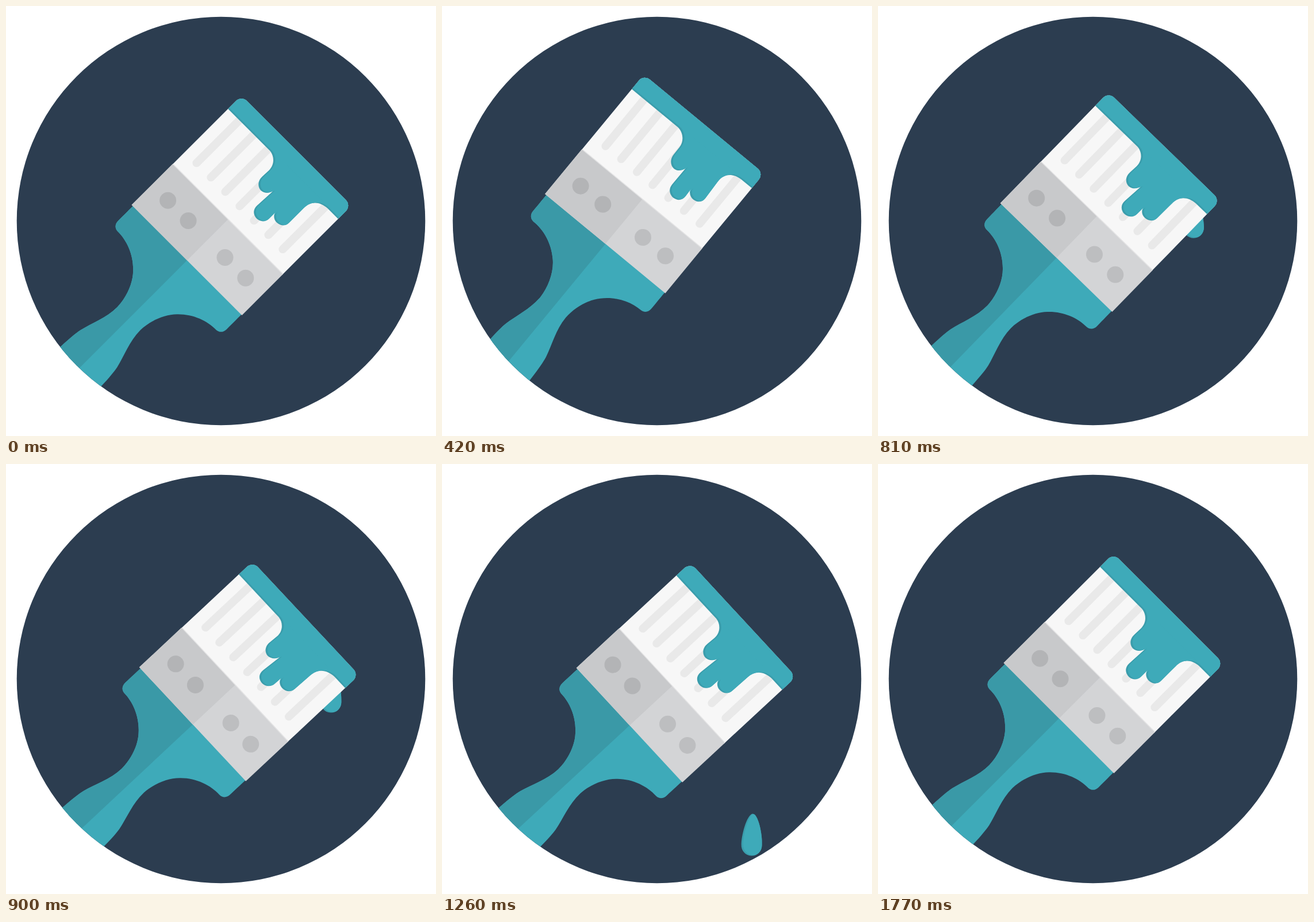
Write an HTML page that moves like this. It is 748 by 748 pixels and loops after 1.8 s.

```html
<!DOCTYPE html>
<html lang="en">
<head>
<meta charset="utf-8">
<title>Paint brush</title>
<style>
  html, body { margin: 0; width: 100%; height: 100%; overflow: hidden; background: #fff; }
  svg { display: block; width: 100vw; height: 100vh; }
</style>
</head>
<body>
<svg viewBox="0 0 748 748">
  <defs>
    <clipPath id="disc"><circle cx="374" cy="374" r="355.3"/></clipPath>
    <path id="handleShape"/>
    <clipPath id="handleClip"><use href="#handleShape"/></clipPath>
    <path id="paintShape"/>
    <clipPath id="paintClip"><use href="#paintShape"/></clipPath>
    <path id="dropShape" d="M0-55C-9-55-18-22-18-1C-18 10-10 18 0 18C10 18 18 10 18-1C18-22 9-55 0-55Z"/>
    <clipPath id="dropClip"><use href="#dropShape"/></clipPath>
  </defs>
  <circle cx="374" cy="374" r="355.3" fill="#2c3d50"/>
  <g clip-path="url(#disc)">
    <g id="swing">
      <g id="drop">
        <use href="#dropShape" fill="#3a9dac"/>
        <g clip-path="url(#dropClip)"><use href="#dropShape" x="3" y="-1" fill="#3eaab9"/></g>
      </g>
      <!-- Upright brush: tip edge centred on 0,0, handle pointing down -->
      <g transform="translate(505 251) rotate(45)">
        <use href="#handleShape" fill="#3eaab9"/>
        <rect x="-140" y="260" width="141" height="400" fill="#3a99a7" clip-path="url(#handleClip)"/>
        <path d="M-135 171V14A14 14 0 0 1-121 0H121.8A14 14 0 0 1 135.8 14V171Z" fill="#f7f7f7"/>
        <g id="bristles" stroke="#e9e9e9" stroke-width="14" stroke-linecap="round"/>
        <use href="#paintShape" fill="#3a9dac"/>
        <g clip-path="url(#paintClip)" fill="#3eaab9">
          <use href="#paintShape" x="2" y="-3"/>
          <rect x="-136" width="272" height="30"/>
        </g>
        <rect x="-135" y="168" width="270.8" height="2" fill="#e3e3e4"/>
        <rect x="-135.3" y="169.5" width="271.3" height="100.3" fill="#d3d4d6"/>
        <rect x="-135.3" y="169.5" width="136.3" height="100.3" fill="#c8c9cb"/>
        <g id="rivets"/>
      </g>
    </g>
  </g>
</svg>
<script>
  const LOOP = 1800, STEP = 30;
  const $ = id => document.getElementById(id);
  const add = (parent, tag, attrs) => {
    const el = document.createElementNS('http://www.w3.org/2000/svg', tag);
    for (const k in attrs) el.setAttribute(k, attrs[k]);
    parent.append(el);
  };

  for (let i = 0; i < 7; i++) {
    const x = -107 + i * 35.35;
    add($('bristles'), 'line', { x1: x, x2: x, y1: 20, y2: 138.5 });
  }
  for (const x of [-96.3, -46.2, 44.2, 94.8])
    add($('rivets'), 'circle', { cx: x, cy: 219.6, r: 14.5, fill: x < 0 ? '#b3b4b6' : '#bdbec0' });

  // One side of the handle, mirrored for the other
  const side = [[133, 265], [133, 276], [133, 290], [133, 306], [133, 313], [129, 319], [121, 319.5],
    [98, 319], [72, 329], [53.4, 348.6], [38, 364], [28.5, 390], [28, 413],
    [28, 440], [40, 465], [45, 487], [49, 505], [51, 560], [48, 620]];
  const right = side.map(([x, y]) => [x + 1.4, y]);
  const left = side.map(([x, y]) => [0.6 - x, y]).reverse();
  $('handleShape').setAttribute('d',
    `M${right[0]}C${right.slice(1).join(' ')}L${left[0]}C${left.slice(1).join(' ')}Z`);

  // Lower edge of the paint; the drips lean sideways in proportion to their length
  const drips = [
    ['L', -32, 33], ['C', -20, 34, -9, 44, -9, 58], ['L', -9.5, 74],
    ['C', -10, 86, -2, 93, 6, 93], ['C', 14, 92.5, 20, 86, 21.6, 78.5], ['L', 19.6, 116],
    ['C', 19, 127, 27, 133, 36, 132.8], ['C', 45, 132, 50.5, 126, 50.6, 117], ['L', 50.6, 101],
    ['C', 51, 108, 57, 113, 65, 113], ['C', 74, 112.5, 80.3, 107, 80.3, 98], ['L', 80.3, 62],
    ['C', 80, 45, 91, 34, 110, 33]
  ];
  const paintPath = lean => 'M-135 33' + drips.map(([cmd, ...p]) =>
    cmd + p.map((n, i) => i % 2 ? n : n + lean * (p[i + 1] - 5))).join('') +
    'L135.8 33V14A14 14 0 0 0 121.8 0H-121A14 14 0 0 0-135 14Z';

  function swingEase(u) {
    let lo = 0, hi = 1, s = 0.5;
    for (let i = 0; i < 24; i++) {
      s = (lo + hi) / 2;
      const x = 3 * s * (1 - s) ** 2 * 0.42 + 3 * s * s * (1 - s) * 0.33 + s ** 3;
      if (x < u) lo = s; else hi = s;
    }
    return s * s * (3 - 2 * s);
  }
  const sineEase = u => (1 - Math.cos(Math.PI * u)) / 2;

  function track(keys, t, ease) {
    const i = Math.max(1, keys.findIndex(k => k[0] > t));
    const [t0, a] = keys[i - 1], [t1, b] = keys[i];
    return a + (b - a) * ease((t - t0) / (t1 - t0));
  }
  const angles = [[0, 0], [600, -6.02], [630, -6.02], [1035, 2.93], [LOOP, 0]];
  const leans = [[0, 0], [270, 0.073], [630, 0], [1020, -0.046], [1500, 0], [LOOP, 0]];

  function dropY(t) {
    const out = Math.min(1, Math.max(0, (t - 440) / 490));
    const fall = Math.max(0, (t - 930) / 330);
    return 365 + 31 * Math.sin(out * Math.PI / 2) + 247 * fall * fall;
  }

  function draw(t) {
    const y = dropY(t), x = 554 - (y - 396) * 0.077;
    $('swing').setAttribute('transform', `rotate(${track(angles, t, swingEase)} 0 748)`);
    $('paintShape').setAttribute('d', paintPath(track(leans, t, sineEase)));
    $('drop').setAttribute('transform', `translate(${x} ${y})`);
  }

  const start = performance.now();
  function tick() {
    const t = (performance.now() - start) % LOOP;
    draw(Math.floor(t / STEP) * STEP);
    requestAnimationFrame(tick);
  }
  tick();
</script>
</body>
</html>
```
